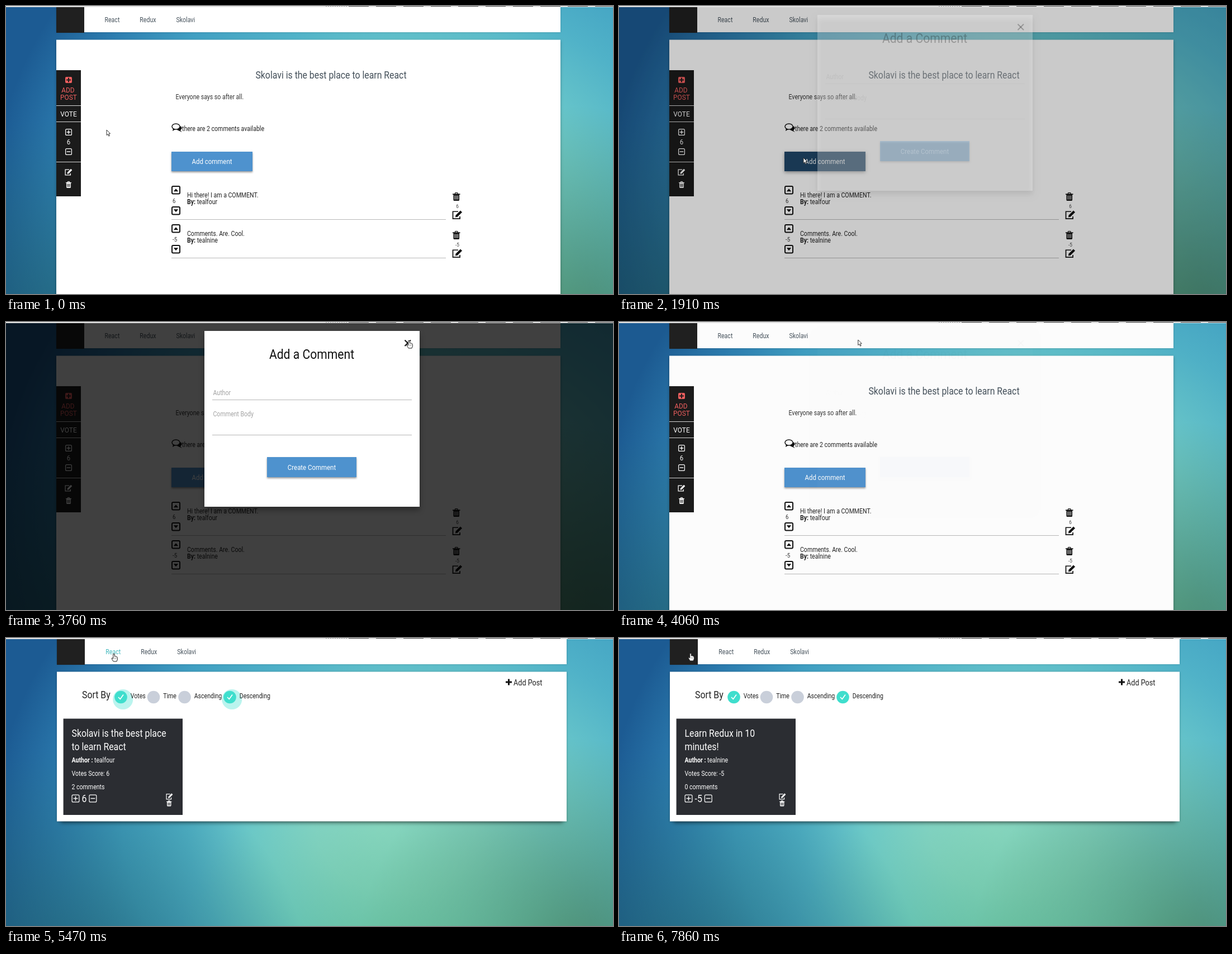
An HTML page with a canvas for the animation above (8 s loop, 1086 by 516 pixels).

```html
<!DOCTYPE html>
<html lang="en">
<head>
<meta charset="utf-8">
<title>Post and comments demo</title>
<style>
  html, body { margin: 0; width: 100%; height: 100%; overflow: hidden; }
  canvas { display: block; }
</style>
</head>
<body>
<canvas id="stage" width="1086" height="516"></canvas>
<script>
const W = 1086, H = 516, LOOP = 8000;
const CONDENSED = 0.88; // one narrow style for all type
const ctx = document.getElementById('stage').getContext('2d');
const SCHOOL = 'Skolavi';
const POST_TITLE = SCHOOL + ' is the best place';
const LIST_OPENS = 5470, CARD_SWAPS = 7160;

// Pointer glides: departure time, arrival time, destination.
const GLIDES = [
  [150, 360, 161, 110], [800, 950, 297, 248], [1220, 1650, 330, 272],
  [2360, 2850, 800, 400], [2850, 3340, 721, 33], [3800, 4060, 428, 32],
  [4060, 5020, 193, 28], [5800, 6460, 228, 352], [6590, 7020, 255, 27],
  [7200, 7860, 128, 27]
];

const clamp = v => Math.min(1, Math.max(0, v));
const progress = (t, from, to) => clamp((t - from) / (to - from));

function pointerAt(t) {
  let x = 180, y = 222;
  for (const [from, to, endX, endY] of GLIDES) {
    const p = progress(t, from, to);
    x += (endX - x) * p;
    y += (endY - y) * p;
  }
  return { x, y };
}

const modalOpacity = t => progress(t, 1850, 2070) * (1 - progress(t, 3780, 4065));
const rippleRadius = t => t < 2360 ? 100 * progress(t, 1720, 1920) : 0;
const haloOpacity = t => 0.36 * (1 - progress(t, LIST_OPENS, LIST_OPENS + 430));

function rect(x, y, w, h, color) {
  ctx.fillStyle = color;
  ctx.fillRect(x, y, w, h);
}

function shadowRect(x, y, w, h, color, blur, dy, alpha) {
  ctx.save();
  ctx.shadowColor = `rgba(0,0,0,${alpha})`;
  ctx.shadowBlur = blur;
  ctx.shadowOffsetY = dy;
  rect(x, y, w, h, color);
  ctx.restore();
}

function disc(x, y, r, color) {
  ctx.fillStyle = color;
  ctx.beginPath();
  ctx.arc(x, y, r, 0, 7);
  ctx.fill();
}

function text(str, x, y, size, color, align = 'left', weight = 400) {
  ctx.save();
  ctx.translate(x, y);
  ctx.scale(CONDENSED, 1);
  ctx.font = `${weight} ${size}px Roboto, sans-serif`;
  ctx.textAlign = align;
  ctx.fillStyle = color;
  ctx.fillText(str, 0, 0);
  const width = ctx.measureText(str).width * CONDENSED;
  ctx.restore();
  return width;
}

function labelled(label, value, x, y, color) {
  const width = text(label + ' ', x, y, 12, color, 'left', 700);
  text(value, x + width, y, 12, color);
}

function line(points, color, width) {
  ctx.strokeStyle = color;
  ctx.lineWidth = width;
  ctx.beginPath();
  points.forEach(([x, y]) => ctx.lineTo(x, y));
  ctx.stroke();
}

function plus(x, y, arm, color, width) {
  line([[x - arm, y], [x + arm, y]], color, width);
  line([[x, y - arm], [x, y + arm]], color, width);
}

function polygon(points, fill, stroke) {
  ctx.beginPath();
  points.forEach(([x, y]) => ctx.lineTo(x, y));
  ctx.closePath();
  ctx.fillStyle = fill;
  ctx.fill();
  if (stroke) {
    ctx.strokeStyle = stroke;
    ctx.lineWidth = 1;
    ctx.stroke();
  }
}

function roundBox(x, y, w, h, r, color, width) {
  ctx.beginPath();
  ctx.roundRect(x, y, w, h, r);
  if (width) {
    ctx.strokeStyle = color;
    ctx.lineWidth = width;
    ctx.stroke();
  } else {
    ctx.fillStyle = color;
    ctx.fill();
  }
}

function signBox(x, y, size, isPlus, color) {
  const mid = size / 2, arm = size * 0.28;
  roundBox(x + 0.6, y + 0.6, size - 1.2, size - 1.2, 2, color, 1.2);
  if (isPlus) plus(x + mid, y + mid, arm, color, 1.4);
  else line([[x + mid - arm, y + mid], [x + mid + arm, y + mid]], color, 1.4);
}

function arrowBox(x, y, dir) {
  roundBox(x + 1, y + 1, 14, 13.5, 2, '#111', 2);
  const mid = y + 7.8, dy = 2.5 * dir;
  polygon([[x + 3.8, mid + dy], [x + 12.2, mid + dy], [x + 8, mid - dy]], '#111');
}

function trash(x, y, w, h, color, gap) {
  roundBox(x + w * 0.32, y + 0.7, w * 0.36, h * 0.2, 1, color, 1.2);
  rect(x, y + h * 0.16, w, h * 0.11, color);
  roundBox(x + w * 0.11, y + h * 0.2, w * 0.78, h * 0.8, 1.5, color);
  for (let k = 0.3; k < 0.8; k += 0.2) rect(x + w * k - 0.5, y + h * 0.37, 1, h * 0.48, gap);
}

function edit(x, y, w, h, color) {
  const spot = (u, v) => [x + w * u, y + h * v];
  const width = w / 11;
  line([spot(0.58, 0.14), spot(0.08, 0.14), spot(0.08, 0.94), spot(0.74, 0.94), spot(0.74, 0.68)], color, width);
  line([spot(0.42, 0.66), spot(0.87, 0.12)], color, width * 2.5);
  polygon([spot(0.31, 0.78), spot(0.35, 0.53), spot(0.53, 0.73)], color);
}

function bubbles() {
  polygon([[306, 222], [313, 215], [315, 219], [312, 223], [315, 226]], '#111');
  ctx.beginPath();
  ctx.ellipse(304, 216, 7, 5, 0, 0, 7);
  ctx.fillStyle = '#fff';
  ctx.fill();
  ctx.strokeStyle = '#111';
  ctx.lineWidth = 1.5;
  ctx.stroke();
  polygon([[299, 219], [298, 224], [303, 221]], '#111');
}

function tint(x, y, r, rgb, alpha) {
  const g = ctx.createRadialGradient(x, y, 0, x, y, r);
  g.addColorStop(0, `rgba(${rgb},${alpha})`);
  g.addColorStop(1, `rgba(${rgb},0)`);
  rect(0, 0, W, H, g);
}

function backdrop() {
  ctx.save();
  ctx.translate(0, 340);
  ctx.scale(1, 0.8);
  const glow = ctx.createRadialGradient(670, 0, 0, 850, 0, 870);
  ['#8fdccb', '#86d6cb', '#6cc9ca', '#50b2c8', '#409fc2', '#2c7caf', '#1c5b93']
    .forEach((color, i, all) => glow.addColorStop(i / (all.length - 1), color));
  rect(0, -H, W, 2 * H, glow);
  ctx.restore();
  tint(1020, 570, 390, '76,138,108', 0.95);
  tint(680, 600, 380, '100,188,142', 0.75);
  tint(120, 620, 420, '36,104,112', 0.75);
}

function browserEdge() {
  rect(0, 0, W, 2, '#e4e4e4');
  for (let x = 572; x < 610; x += 4) rect(x, 0, 2, 1, '#999');
  for (let x = 613; x < W; x += 49) rect(x, 0, 36, 1, '#555');
}

function header(left, right, pointer) {
  shadowRect(left, 2, right - left, 45, '#fff', 3, 0, 0.2);
  rect(left, 2, 50, 46, '#202020');
  let x = left === 90 ? 176.5 : 178.3;
  for (const name of ['React', 'Redux', SCHOOL]) {
    const over = pointer.y < 36 && pointer.x > x && pointer.x < x + 30;
    x += text(name, x, 28.5, 12, over ? '#3fb8bd' : '#46525c') + 36;
  }
}

function sideMenu() {
  const dark = '#1b1b1b', red = '#ef5f5f';
  rect(90, 115, 44, 226, dark);
  for (const y of [178, 207, 279]) rect(90, y, 44, 1, '#d8d8d8');
  roundBox(106, 127, 12, 11, 2, red);
  plus(112, 132.5, 4, dark, 2);
  text('ADD', 111, 155, 13.5, red, 'center');
  text('POST', 112, 168, 13.5, red, 'center');
  text('VOTE', 112, 197.5, 13.5, '#fff', 'center');
  signBox(106, 220, 12, true, '#fff');
  text('6', 112, 248, 13, '#fff', 'center');
  signBox(106, 255, 12, false, '#fff');
  edit(105, 291.5, 14, 12, '#fff');
  trash(107, 314, 10, 12, '#fff', dark);
}

function button(x, y, w, h, label, hover, ripple) {
  shadowRect(x, y, w, h, hover ? '#337ab7' : '#4e92ce', hover ? 6 : 3, 2, 0.4);
  ctx.save();
  ctx.beginPath();
  ctx.rect(x, y, w, h);
  ctx.clip();
  if (ripple) disc(x + w / 2, y + h / 2, ripple, '#1f4769');
  text(label, x + w / 2, y + h / 2 + 4.5, 13, '#fff', 'center');
  ctx.restore();
}

function comment(y, votes, body, author) {
  arrowBox(296, y, 1);
  text(votes, 298, y + 31, 11, '#333');
  arrowBox(296, y + 37, -1);
  text(body, 324, y + 21, 12, '#222');
  labelled('By:', author, 324, y + 33, '#222');
  trash(799, y + 12, 13.5, 15, '#111', '#fff');
  text(votes, 807.5, y + 39.5, 9.5, '#444', 'center');
  edit(798, y + 44, 19, 16, '#111');
  rect(296, y + 60, 491, 1, '#b8b8b8');
}

function postPage(t, pointer) {
  header(90, 992, pointer);
  shadowRect(90, 60.5, 902, 480, '#fff', 5, 1, 0.3);
  sideMenu();
  text(POST_TITLE + ' to learn React', 581.5, 130, 18, '#434f59', 'center');
  text('Everyone says so after all.', 303.5, 167, 12, '#333');
  bubbles();
  text('there are 2 comments available', 315, 223.5, 12, '#222');
  button(296, 261, 145, 35, 'Add comment', t > 1500 && t < 2360, rippleRadius(t));
  comment(322, '6', 'Hi there! I am a COMMENT.', 'tealfour');
  comment(391, '-5', 'Comments. Are. Cool.', 'tealnine');
}

function field(label, baseline, lineY) {
  text(label, 370.5, baseline, 12, '#a2a2a2');
  rect(369, lineY, 357, 1, '#b5b5b5');
}

function modal(opacity) {
  if (!opacity) return;
  ctx.save();
  ctx.globalAlpha = opacity;
  rect(0, 2, W, H, 'rgba(0,0,0,.75)');
  shadowRect(355, 16, 385, 315, '#fff', 10, 6, 0.35);
  text('Add a Comment', 547, 66, 24, '#111', 'center');
  line([[713.5, 32.5], [724, 43]], '#111', 2);
  line([[724, 32.5], [713.5, 43]], '#111', 2);
  field('Author', 130.5, 139);
  field('Comment Body', 168.5, 202);
  button(467, 242, 160, 36, 'Create Comment');
  ctx.restore();
}

function option(x, label, on, halo) {
  if (on && halo) disc(x + 3.7, 110, 18, `rgba(64,224,208,${halo})`);
  disc(x, 106, 11.3, on ? '#3fdecd' : '#c9cfda');
  if (on) line([[x - 4.5, 106], [x - 1.2, 109.5], [x + 4.5, 101.5]], '#fff', 1.7);
  text(label, x + 17.2, 108, 12, '#222');
}

function card(post) {
  const white = '#fff', dark = '#2b2d32';
  rect(102.6, 144.5, 213.4, 172.5, dark);
  post.title.forEach((row, i) => text(row, 117.5, 177 + 24 * i, 18, white));
  labelled('Author :', post.author, 117.5, 223, white);
  text('Votes Score: ' + post.votes, 117.5, 247, 12, white);
  text(post.comments + ' comments', 117.5, 271, 12, white);
  signBox(117.5, 280.5, 14, true, white);
  const width = text(post.votes, 135.5, 294, 18, white);
  signBox(139.5 + width, 280.5, 14, false, white);
  edit(286, 278, 13, 11.5, white);
  trash(287, 291, 9.5, 10.5, white, dark);
}

function listPage(t, pointer) {
  header(91, 1003, pointer);
  shadowRect(98, 290, 898, 37, '#fff', 7, 4, 0.5);
  shadowRect(91, 60.5, 912, 268, '#fff', 4, 0, 0.25);
  text('Sort By', 136, 107.5, 18, '#222');
  const halo = haloOpacity(t);
  option(205.5, 'Votes', true, halo);
  option(264, 'Time', false);
  option(319.5, 'Ascending', false);
  option(400.5, 'Descending', true, halo);
  plus(899.5, 79, 5.5, '#111', 3);
  text('Add Post', 908, 84.5, 14.4, '#222');
  card(t < CARD_SWAPS
    ? { title: [POST_TITLE, 'to learn React'], author: 'tealfour', votes: '6', comments: 2 }
    : { title: ['Learn Redux in 10', 'minutes!'], author: 'tealnine', votes: '-5', comments: 0 });
}

function drawPointer({ x, y }, hand) {
  ctx.save();
  ctx.translate(x, y);
  if (hand) {
    polygon([[-1.2, 0.5], [1.2, 0.5], [1.4, 5], [3.5, 4.8], [6, 6.2], [6.5, 10], [5, 14],
      [-0.8, 14], [-4, 9], [-3.2, 7.6], [-1.2, 9]], '#fff', '#222');
    for (const dx of [1.5, 3.7]) line([[dx, 7], [dx, 10]], '#777', 0.7);
  } else {
    polygon([[0, 0], [0, 9.5], [2.2, 7.7], [3.9, 11.2], [5.4, 10.4], [3.8, 7], [6.5, 6.6]], '#fff', '#333');
  }
  ctx.restore();
}

function overLink({ x, y }, modalOpen) {
  if (modalOpen) return x > 710 && x < 727 && y > 28 && y < 46;
  const links = [[90, 141], [176, 205], [239, 269], [304, 342]];
  return y < 47 && links.some(([left, right]) => x >= left && x <= right);
}

function render(t) {
  const pointer = pointerAt(t);
  const fade = modalOpacity(t);
  backdrop();
  if (t < LIST_OPENS) postPage(t, pointer);
  else listPage(t, pointer);
  modal(fade);
  browserEdge();
  drawPointer(pointer, overLink(pointer, fade > 0.5));
}

const start = performance.now();
function tick() {
  render((performance.now() - start) % LOOP);
  requestAnimationFrame(tick);
}
tick();
</script>
</body>
</html>
```
